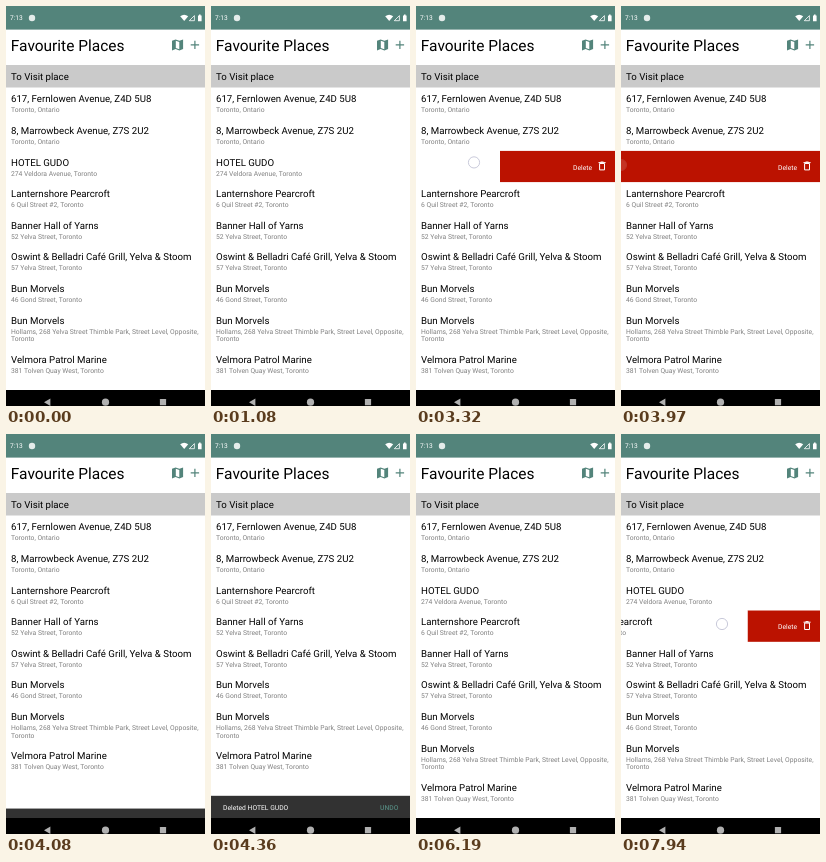
An HTML page for the animation above (8 s loop, 199 by 400 pixels).

```html
<!DOCTYPE html>
<html lang="en">
<head>
<meta charset="utf-8">
<title>Favourite Places</title>
<style>
  html, body { margin: 0; width: 100%; height: 100%; overflow: hidden; background: #fff; }
  svg { display: block; width: 100vw; height: 100vh; }
  text { font: 6.77px Roboto, sans-serif; text-rendering: geometricPrecision; fill: #fff; }
  .title { font-size: 9.67px; fill: #000; }
  .heading { font-size: 15.48px; fill: #000; }
  .sub { fill: #808080; }
  .teal { fill: #53847b; }
  .clock { font-size: 6.6px; }
  .undo { font-weight: 500; }
</style>
</head>
<body>
<svg viewBox="0 0 199 400">
  <rect width="199" height="400" fill="#fff"/>

  <g id="remove">
    <rect id="panel" width="199" height="31.6" fill="#bb1200"/>
    <text x="157" y="18.9">Delete</text>
    <path d="M183.6 12.8h4.9v6.4h-4.9zM182.5 11.9h7.1M184.6 11.3h2.9" fill="none" stroke="#fff" stroke-width="1"/>
  </g>
  <g id="list"></g>

  <rect y="59" width="199" height="22.5" fill="#cacaca"/>
  <text class="title" x="5" y="74">To Visit place</text>
  <text class="heading" x="4.8" y="44.8">Favourite Places</text>

  <g class="teal">
    <path fill-rule="evenodd" d="M166 34.8l3.6-1.3 3.8 1.3 3.7-1.3v9.6l-3.7 1.3-3.8-1.3-3.6 1.3zM169.8 34.8v7.2l3.5 1.2v-7.2z"/>
    <path d="M188.3 34.7h1.2v3.6h3.6v1.2h-3.6v3.6h-1.2v-3.6h-3.6v-1.2h3.6z"/>
    <rect width="199" height="23.6"/>
  </g>

  <g fill="#fff">
    <text class="clock" x="4" y="14.4">7:13</text>
    <circle cx="26" cy="12" r="3.2" fill="#e4ecea"/>
    <path d="M174.2 10.2q4-3 8 0l-4 4.9z"/>
    <path d="M188.4 9.6v5.1h-5.1z" fill="none" stroke="#fff" stroke-width=".8"/>
    <path d="M192 9.4h1v-.8h1.6v.8h1v5.8h-3.6z"/>
  </g>

  <g id="snackbar">
    <rect y="361.8" width="199" height="24" fill="#323232"/>
    <g id="message">
      <text x="12" y="375.7">Deleted HOTEL GUDO</text>
      <text class="teal undo" x="169" y="375.7">UNDO</text>
    </g>
  </g>

  <rect y="384" width="199" height="16" fill="#000"/>
  <g fill="#b0b0b0">
    <path d="M38 396.2l6.4-3.7v7.4z"/>
    <circle cx="99.5" cy="396.2" r="3.6"/>
    <rect x="153.9" y="393.1" width="6.2" height="6.2" rx=".5"/>
  </g>

  <circle id="finger" r="5.6" fill="#fff" fill-opacity=".78" stroke="#c3c5d6" stroke-width=".9"/>
</svg>

<script>
const LOOP = 8000, WIDTH = 199, LIST_TOP = 81.5, ROW = 31.6, LINE = 7.9, DELETED = 2;

const places = [
  ['617, Fernlowen Avenue, Z4D 5U8', 'Toronto, Ontario'],
  ['8, Marrowbeck Avenue, Z7S 2U2', 'Toronto, Ontario'],
  ['HOTEL GUDO', '274 Veldora Avenue, Toronto'],
  ['Lanternshore Pearcroft', '6 Quil Street #2, Toronto'],
  ['Banner Hall of Yarns', '52 Yelva Street, Toronto'],
  ['Oswint & Belladri Café Grill, Yelva & Stoom', '57 Yelva Street, Toronto'],
  ['Bun Morvels', '46 Gond Street, Toronto'],
  ['Bun Morvels', 'Hollams, 268 Yelva Street Thimble Park, Street Level, Opposite,', 'Toronto'],
  ['Velmora Patrol Marine', '381 Tolven Quay West, Toronto']
];

// Each step holds until the next one. touch: [x, y, opacity], swipe: [row, offset]
const steps = [
  { at: 0 },
  { at: 2870, touch: [172.4, 154, .7] },
  { at: 2940, touch: [132, 154.4] },
  ...[[3080, 101], [3200, 78], [3320, 58], [3460, 40], [3580, 24], [3710, 11]].map(([at, x], i) =>
    ({ at, touch: [x, 155 + i * .7], swipe: [2, 173 - x] })),
  { at: 3850, touch: [2, 159], swipe: [2, 185] },
  { at: 3970, touch: [0, 159, .18], swipe: [2, WIDTH] },
  { at: 4080, gone: true, bar: .45, message: 0 },
  { at: 4200, gone: true, bar: .97, message: .5 },
  { at: 4360, gone: true, bar: 1 },
  { at: 5790, gone: true, bar: 1, touch: [170, 373.5] },
  { at: 5940, bar: .75, message: .6 },
  { at: 6060, bar: .2, message: 0 },
  { at: 6190 },
  { at: 7860, touch: [146, 190], swipe: [3, 6] },
  { at: 7940, touch: [101, 190], swipe: [3, 72.5] }
];

const byId = id => document.getElementById(id);
const [list, remove, panel, snackbar, message, finger] =
  ['list', 'remove', 'panel', 'snackbar', 'message', 'finger'].map(byId);

function add(parent, tag, attributes, content = '') {
  const node = document.createElementNS('http://www.w3.org/2000/svg', tag);
  for (const key in attributes) node.setAttribute(key, attributes[key]);
  node.textContent = content;
  return parent.appendChild(node);
}

const move = (node, x, y) => node.setAttribute('transform', `translate(${x} ${y})`);
const show = (node, visible) => { node.style.display = visible ? '' : 'none'; };

let nextTop = LIST_TOP;
const rows = places.map(([title, ...lines]) => {
  const node = add(list, 'g'), top = nextTop;
  const height = ROW + (lines.length - 1) * LINE;
  add(node, 'rect', { width: WIDTH, height, fill: '#fff' });
  add(node, 'text', { class: 'title', x: 5, y: 14.9 }, title);
  lines.forEach((line, i) => add(node, 'text', { class: 'sub', x: 5, y: 24.9 + i * LINE }, line));
  nextTop += height;
  return { node, top };
});

function render(time) {
  const { touch, swipe, gone = false, bar = 0, message: alpha = 1 } =
    steps.findLast(step => step.at <= time);

  rows.forEach(({ node, top }, i) => {
    const offset = swipe && swipe[0] === i ? swipe[1] : 0;
    show(node, !(gone && i === DELETED));
    move(node, -offset, top - (gone && i > DELETED ? ROW : 0));
  });

  show(remove, swipe);
  if (swipe) {
    move(remove, 0, rows[swipe[0]].top);
    panel.setAttribute('x', WIDTH - swipe[1]);
  }

  show(snackbar, bar > 0);
  move(snackbar, 0, (1 - bar) * 23.2);
  message.setAttribute('opacity', alpha);

  show(finger, touch);
  if (touch) {
    move(finger, touch[0], touch[1]);
    finger.setAttribute('opacity', touch[2] ?? 1);
  }
}

const start = performance.now();
function tick() {
  render((performance.now() - start) % LOOP);
  requestAnimationFrame(tick);
}
tick();
</script>
</body>
</html>
```
